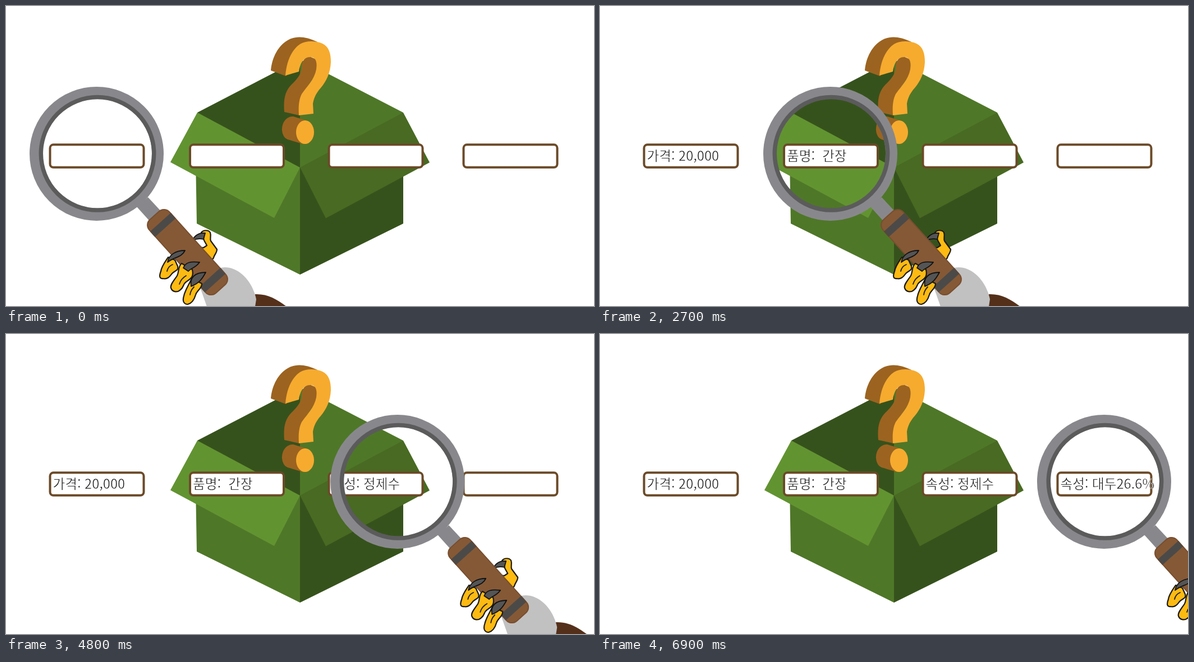
An HTML page that plays this animation: 1048 by 535 pixels, repeating every 7 s.

```html
<!DOCTYPE html>
<html lang="ko">
<meta charset="utf-8">
<title>Mystery box</title>
<style>
  html, body { margin: 0; height: 100%; overflow: hidden; background: #fff; }
  svg { display: block; width: 1048px; height: 535px; }
  /* The white outline thins the glyphs */
  text { font: 300 23.6px "Noto Sans CJK KR", "Noto Sans CJK", sans-serif; white-space: pre;
    fill: #111; stroke: #fff; stroke-width: .6; }
  .toe { fill: #fdba12; stroke: #1c1a17; stroke-width: 2.2; stroke-linejoin: round; }
  .claw { fill: #555556; stroke: #111; stroke-width: 1.8; stroke-linejoin: round; }
  .crease { fill: none; stroke: #1c1a17; stroke-width: 1.8; stroke-linecap: round; }
</style>
<svg viewBox="0 0 1048 535">
  <g id="box">
    <path fill="#4f7728" d="M524 95 708 190 690 220 524 290ZM338.5 300 340 388 524 479 525 288Z"/>
    <path fill="#36521c" d="M341 190 524 95V290L360 220ZM708 300V388L524 479V288Z"/>
    <path fill="#629331" d="M341 190 293 278.5 478 378 524 288Z"/>
    <path fill="#486a22" d="M708 190 755 279 570 378.5 524 288Z"/>
  </g>
  <g id="question">
    <path fill="#9c6320" d="M472 115C474 92 485 70 504 60 519 53 533 54 555 64L530 90 499 125Z
      M541 90 555 96 553 120 526 160 523 195 496 189C494 165 498 151 509 140 521 128 527 120 527 108 528 97 533 91 541 90Z"/>
    <path fill="#f6ab2f" d="M498 124C500 99 509 78 524 68 535 61 553 62 564 67 576 73 579 85 579 100 578 120 571 134 561 146
      553 155 549 163 547 174L548 192 522 195C521 179 522 167 527 157 535 145 550 131 553 113 555 99 552 91 542 91
      530 91 524 103 522 117Z"/>
    <path fill="#9c6320" d="M535 204 512 197C498 197 491 210 492 222 493 231 497 236 502 238L529 246Z"/>
    <ellipse cx="533" cy="225" rx="16" ry="21" fill="#f6ab2f"/>
  </g>
  <g id="labels"></g>
  <g id="glass">
    <path fill="#54301a" d="M444 514C466 513 483 523 500 536H440Z"/>
    <path fill="#c1c1c1" d="M346 502 358 536H444L446 523C439 490 415 466 390 466 375 466 362 478 346 502Z"/>
    <path fill="#88888c" d="M233 358 253 341 280 370 260 388Z"/>
    <circle cx="161.5" cy="263.5" r="109" fill="none" stroke="#88888c" stroke-width="21"/>
    <circle cx="163" cy="263.3" r="100.7" fill="none" stroke="#5b5b5c" stroke-width="7.5"/>
    <path class="toe" d="M348 404C352 399 361 399 364 404 366 410 363 415 365 419L376 434C376 440 371 444 370 449 367 455 361 453 357 448L344 430 352 431 358 427 353 418 351 411Z"/>
    <path class="claw" d="M332 418C337 408 345 404 355 405L352 416C345 414 339 415 332 418Z"/>
    <g transform="translate(323.5 439) rotate(48)">
      <rect x="-89" y="-25" width="178" height="50" rx="14" fill="#855936"/>
      <path fill="#4b4a48" d="M-72-25h13v50h-13ZM60-25h14v50h-14Z"/>
      <rect x="-88" y="-24" width="176" height="48" rx="13" fill="none" stroke="#6d4529" stroke-width="2" opacity=".5"/>
    </g>
    <path class="toe" d="M289 448C283 457 277 465 276 473 273 481 273 487 280 486 288 488 292 482 296 477 302 471 308 472 306 464L301 453Z"/>
    <path class="toe" d="M313 459C306 465 309 473 305 481 300 489 292 497 294 503 297 511 306 511 311 506 317 502 315 496 321 492 330 486 335 483 332 470Z"/>
    <path class="toe" d="M331 486C326 497 319 507 317 517 314 526 317 532 324 532 332 530 336 522 338 515 340 507 349 505 349 495Z"/>
    <path class="crease" d="M287 473Q289 464 297 461M309 496Q312 486 321 481M328 515Q329 507 335 501"/>
    <path class="claw" d="M288 457C290 444 302 436 319 436 313 449 300 447 288 457Z"/>
    <path class="claw" d="M316 467C320 457 329 455 345 457 337 468 331 466 325 473Z"/>
    <path class="claw" d="M330 500C327 484 337 475 356 475 350 486 345 494 330 500Z"/>
  </g>
</svg>
<script>
  const SPEED = 20.1;
  // x: frame position, start: step after which typing begins
  const labels = [
    { x: 78.5, start: 0, text: "가격: 20,000" },
    { x: 328, start: 22, text: "품명:  간장" },
    { x: 575.5, start: 40, text: "속성: 정제수" },
    { x: 815.5, start: 58, text: "속성: 대두26.6%" },
  ];
  // Each move begins once the previous label is typed
  const moves = [
    { start: 9, distance: 249 },
    { start: 27, distance: 247 },
    { start: 46, distance: 241 },
  ];
  const clamp = (v, max) => Math.max(0, Math.min(v, max));
  const glass = document.getElementById("glass");
  const group = document.getElementById("labels");

  group.innerHTML = labels.map(({ x }) =>
    `<rect x="${x}" y="247.3" width="167" height="40.5" rx="6" fill="#fff" stroke="#6b4a28" stroke-width="4"/>
     <text x="${x + 5}" y="276"></text>`).join("");
  const texts = group.querySelectorAll("text");

  function draw(now) {
    let step = Math.floor(now % 7000 / 100);
    if (step > 55) step--; // the motion pauses for one step
    labels.forEach(({ start, text }, i) => {
      const count = clamp(step - start, text.length);
      texts[i].textContent = text.match(new RegExp(`^(\\s*\\S){0,${count}}`))[0];
    });
    const x = moves.reduce((sum, m) => sum + clamp((step - m.start) * SPEED, m.distance), 0);
    glass.setAttribute("transform", `translate(${x})`);
    requestAnimationFrame(draw);
  }
  requestAnimationFrame(draw);
</script>
</html>
```
